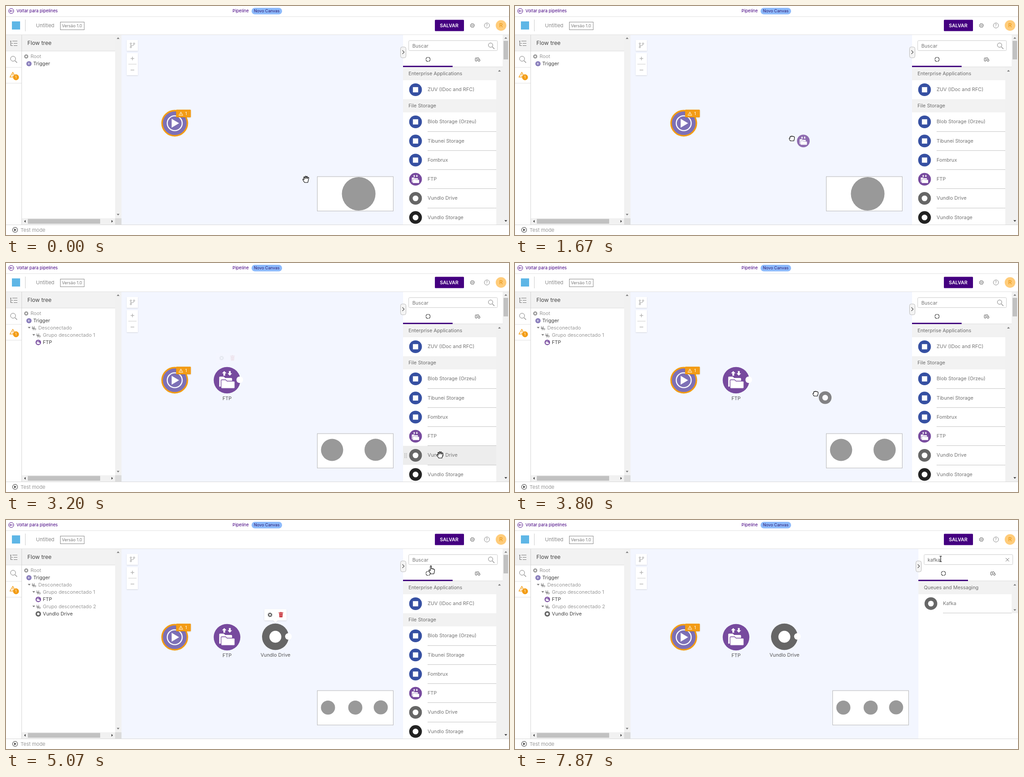
Recreate the animation shown at these times as an HTML page. Size 1106x506 px, loop 8000 ms.

```html
<!DOCTYPE html>
<html lang="pt">
<head>
<meta charset="utf-8">
<title>Pipeline</title>
<style>
html, body { margin: 0; width: 100%; height: 100%; overflow: hidden; background: #fff; }
svg { display: block; font-family: Inter, "Open Sans", sans-serif; }
text { white-space: pre; }
</style>
</head>
<body>
<svg id="stage" width="1106" height="506" viewBox="0 0 1106 506"></svg>
<script>
const PURPLE = '#440080', FTP = '#774a9e', BLUE = '#3650a2', GREY = '#666', ORANGE = '#f39c12';

const rect = (x, y, w, h, fill, more = '') =>
  `<rect x="${x}" y="${y}" width="${w}" height="${h}" fill="${fill}" ${more}/>`;
const circle = (x, y, r, fill, more = '') => `<circle cx="${x}" cy="${y}" r="${r}" fill="${fill}" ${more}/>`;
const line = (d, stroke, w = 1, more = '') =>
  `<path d="${d}" fill="none" stroke="${stroke}" stroke-width="${w}" ${more}/>`;
const fill = (d, color, more = '') => `<path d="${d}" fill="${color}" ${more}/>`;
// y is the middle of the capitals
const label = (x, y, s, color = '#747474', size = 10.8, more = '') =>
  `<text x="${x}" y="${y + size * .37}" fill="${color}" font-size="${size}" ${more}>${s}</text>`;
const group = (id, body, more = '') => `<g id="${id}" ${more}>${body}</g>`;
const at = (x, y, body, scale = 1) => `<g transform="translate(${x} ${y}) scale(${scale})">${body}</g>`;

// marks are drawn for a disc of radius 29
const marks = {
  square: rect(-12, -12, 24, 24, '#fff'),
  dot: circle(0, 0, 13, '#fff'),
  folder: fill('M-17 14V-6q0-2 2-2h8l3 3h13q2 0 2 2V14z', '#fff') +
    fill('M-11-1h8l3 3h15q2 0 2 2v12q0 2-2 2h-26q-2 0-2-2V1q0-2 2-2z', '#fff', `stroke="${FTP}" stroke-width="1.3"`) +
    fill('M-8-10v-5h-3l5-5 5 5h-3v5zM4-20h4v5h3l-5 5-5-5h3z', '#fff'),
  play: circle(0, 0, 17, 'none', 'stroke="#fff" stroke-width="2.4"') + fill('M-7-10L10 0-7 10z', '#fff')
};
const disc = (x, y, r, color, mark) => at(x, y, circle(0, 0, 29, color) + marks[mark], r / 29);

const arrow = (x, y, turn, color = '#777') =>
  `<path d="M-3 1.7L0-1.7 3 1.7z" fill="${color}" transform="translate(${x} ${y}) rotate(${turn})"/>`;
const lens = (x, y, r) => circle(x - 1, y - 1, r, 'none', 'stroke="#777"') +
  line(`M${x + r * .6} ${y + r * .6}l4.5 4.5`, '#777', 1.2);
const teeth = (x, y, r, color) =>
  circle(x, y, r * .88, 'none', `stroke="${color}" stroke-width="${r * .3}" stroke-dasharray="${r * .345}"`);
const gear = (x, y, r, color) =>
  circle(x, y, r * .62, 'none', `stroke="${color}" stroke-width="${r * .45}"`) + teeth(x, y, r, color);
const thinGear = (x, y, r, color) => [r * .3, r * .75].map(s => circle(x, y, s, 'none', `stroke="${color}"`)).join('') +
  teeth(x, y, r, color);
const warn = (x, y, s, color) => at(x, y, line('M0-5L5.5 4.5H-5.5z', color, 1.1, 'stroke-linejoin="round"') +
  line('M0-2V1.5M0 2.5V3.6', color, 1.1), s);
const plug = (x, y) => at(x, y, fill('M-4-1h6v2l-2 2h-2l-2-2z', '#999') +
  line('M-3-4v3M1-4v3M-1 3v2', '#999', 1.4) + gear(3, 2.5, 2.4, '#999'));
const branch = (y, n) => arrow(61, y, 180) + plug(71, y + .5) + label(81, y, 'Grupo desconectado ' + n, '#999');

const topBar = rect(0, 0, 1106, 64, '#fff') +
  line('M0 23.5H1106M0 63.5H1106', '#e2e2e2') +
  circle(11.5, 11, 5.5, 'none', `stroke="${PURPLE}"`) + line('M15 11H8.5M11 8.5L8.5 11 11 13.5', PURPLE) +
  label(23, 11, 'Voltar para pipelines', PURPLE, 9.4) +
  label(498, 10.3, 'Pipeline', PURPLE, 9.6) +
  rect(540, 4, 67, 14.5, '#8dbafb', 'rx="7.2"') + label(545, 11, 'Novo Canvas', '#2f1a70', 9) +
  rect(13, 34, 18, 18, '#5eb6e6') + line('M42.5 30V56', '#ccc') +
  label(66, 43, 'Untitled', '#8a8a8a', 11) +
  rect(119.5, 35.5, 52.5, 17, '#fff', 'stroke="#888"') + label(123, 44, 'Versão 1.0', '#777', 9.1) +
  rect(943, 30.5, 64, 25, PURPLE, 'rx="1.5"') + label(954, 43, 'SALVAR', '#fff', 10.5, 'font-weight="600"') +
  thinGear(1025.5, 43, 5, '#888') +
  circle(1057.5, 43, 5.7, 'none', 'stroke="#888"') + label(1055, 43, '?', '#888', 8.5) +
  circle(1088.5, 43, 11.7, '#ffcc7a') + label(1084.5, 43, 'R', '#e8920c', 12);

const rail = rect(0, 64, 34, 419, '#fff') + rect(0, 64, 34, 35, '#f2f2f2') +
  line('M0 99.5H34M0 135.5H34M0 170.5H34', '#e2e2e2') +
  line('M9 77.5h3M14 77.5H25M12 82.5h3M17 82.5H25M12 87.5h3M17 87.5H25M10.5 78V87.5H12', '#777', 1.2) +
  lens(16.5, 117.5, 5.5) + warn(15, 152, 1.15, ORANGE) +
  circle(22, 157.5, 6.5, ORANGE) + label(20, 157.5, '1', '#fff', 8);

const tree = rect(35, 64, 205, 405, '#fff') + rect(35, 64, 205, 35, '#f2f2f2') +
  line('M35 99.5H240', '#ddd') + label(47, 81, 'Flow tree', '#444', 12.2) +
  rect(240, 64, 14, 405, '#f1f1f1') + rect(35, 469, 205, 14, '#f1f1f1') + rect(240, 469, 14, 14, '#dcdcdc') +
  rect(48, 470.5, 159, 10.5, '#c1c1c1') +
  arrow(246.5, 71, 0) + arrow(246.5, 461, 180) + arrow(41.5, 475.7, -90, '#444') + arrow(233.5, 475.7, 90, '#444') +
  line('M34.5 64V483', '#d4d4d4') +
  circle(44.5, 111.5, 3.2, '#fff', 'stroke="#999" stroke-width="2.6"') + label(54, 111, 'Root', '#999') +
  disc(50.5, 127.5, 5.6, '#7a6db3', 'play') + label(60, 127, 'Trigger', '#444') +
  group('tree1', arrow(51, 143, 180) + plug(61, 143.5) + label(71, 143, 'Desconectado', '#999') +
    branch(159, 1) + disc(71, 175.5, 6, FTP, 'folder') + label(81, 175, 'FTP', '#444')) +
  group('tree2', branch(191, 2) + disc(71, 207.5, 6, GREY, 'dot') + label(81, 207, 'Vundlo Drive', '#444'));

const tools = rect(265.5, 75, 24.5, 24, '#fff', 'filter="url(#soft)"') +
  rect(265.5, 104, 24.5, 49, '#fff', 'filter="url(#soft)"') + line('M269 128.5H287', '#ccc') +
  line('M278 112V120M274 116H282M274 141.5H282', '#999') +
  line('M274.5 85V89.5M281.5 85Q281.5 87.5 274.5 88', '#999') +
  [[274.5, 83], [281.5, 83], [274.5, 91]].map(([x, y]) => circle(x, y, 1.5, '#fff', 'stroke="#999"')).join('');

const toolbox = (id, x, y) => group(id,
  `<g filter="url(#soft)">` + rect(x - 24.5, y - 12.5, 49, 25, '#fff', 'rx="2"') +
  fill(`M${x - 5} ${y + 12}h10l-5 5.5z`, '#fff') + '</g>' + gear(x - 12, y, 5, '#666') +
  fill(`M${x + 8} ${y - 3}h8l-.7 8.5h-6.6zM${x + 7} ${y - 5.2}h3.5l.5-1h2l.5 1h3.5v1.4h-10z`, '#c4262e') +
  line(`M${x + 10.5} ${y - 1.5}v5.5M${x + 13.5} ${y - 1.5}v5.5`, '#fff', .7));

const nodes = disc(371, 259, 28, '#7d70b6', 'play') +
  circle(371, 259, 27.8, 'none', `stroke="${ORANGE}" stroke-width="3.4"`) +
  rect(374, 229, 32.5, 17, ORANGE, 'rx="1.5" filter="url(#soft)"') +
  warn(384.5, 238, .8, '#fff') + label(394, 237.5, '1', '#fff', 9.5) +
  group('node1', disc(486, 259, 29.3, FTP, 'folder') + label(476, 299, 'FTP', '#555') +
    group('port1', circle(514, 258, 7.3, '#fff')) + toolbox('box1', 486, 210)) +
  group('node2', disc(592.3, 258, 29.3, GREY, 'dot') + circle(621, 257.3, 7.3, '#fff') +
    label(592.5, 298.5, 'Vundlo Drive', '#555', 10.8, 'text-anchor="middle"') + toolbox('box2', 592.5, 209.5));

const dots = (id, r, pts) => group(id, pts.map(([x, y]) => circle(x, y, r, '#999')).join(''));
const minimap = group('map', rect(684.5, 377, 167, 76, '#fff', 'stroke="#b5b5b5"') +
  dots('map0', 37, [[775.5, 415]]) + dots('map1', 24.4, [[717, 413], [812.7, 412.7]]) +
  dots('map2', 15.5, [[708, 414.5], [768, 414.5], [824, 414]]));

const rows = [
  [164, 'ZUV (IDoc and RFC)', BLUE, 'square'], [235, 'Blob Storage (Orzeu)', BLUE, 'square'],
  [277.3, 'Tibunei Storage', BLUE, 'square'], [319.5, 'Fombrux', BLUE, 'square'],
  [361.8, 'FTP', FTP, 'folder'], [404, 'Vundlo Drive', GREY, 'dot'], [446.3, 'Vundlo Storage', '#222', 'dot']
];
const row = ([y, name, color, mark]) => disc(900.5, y + 21, 14, color, mark) + label(927, y + 20.3, name) +
  line(`M927 ${Math.floor(y + 42) + .5}H1078`, '#c4c4c4');
const heading = (y, s) => rect(873, y, 205, 29, '#f2f2f2') + label(885, y + 13.7, s, '#6b6b6b');
const grip = [0, 1, 2, 3].map(i => circle(-1.5, i * 3, .9, '#aaa') + circle(2, i * 3, .9, '#aaa')).join('');

const panel = group('panel', rect(873, 64, 233, 419, '#fff') +
  rect(885.5, 76.5, 195, 22, '#fff', 'stroke="#ccc" rx="2"') +
  group('hint', label(893.5, 88, 'Buscar', '#757575', 10.7) + lens(1066.5, 87.5, 4.8)) +
  label(893.3, 88, '', '#666', 10.8, 'id="query"') +
  group('clear', line('M1065 84l7.5 7.5M1072.5 84L1065 91.5', '#666')) +
  rect(0, 82, 1, 12, '#222', 'id="caret"') +
  circle(928, 118, 4.6, 'none', 'stroke="#333" stroke-width="1.2" stroke-dasharray="6.2 1"') +
  rect(1032, 114.5, 3.6, 7.5, 'none', 'stroke="#444" rx="1.8"') + circle(1040, 120, 2.2, 'none', 'stroke="#444"') +
  line('M1036 114.5h3l1.5 3', '#444') +
  line('M873 134.5H1092', '#ddd') + rect(873, 132, 109, 3, PURPLE) +
  rect(1078, 135, 14, 348, '#f1f1f1', 'id="strip"') + arrow(1085, 143, 0) +
  group('all', group('hover', rect(873, 0, 205, 42, '#ededed') + at(878.5, 17, grip)) + rows.map(row).join('') +
    heading(135, 'Enterprise Applications') + heading(206, 'File Storage') +
    rect(1092, 64, 14, 419, '#f1f1f1') + rect(1094, 77, 10, 41, '#c1c1c1') +
    arrow(1099, 70.5, 0) + arrow(1099, 475, 180, '#333')) +
  group('found', heading(135, 'Queues and Messaging') + row([163.7, 'Kafka', GREY, 'dot']) + arrow(1085, 199, 180)) +
  rect(867.5, 90.5, 12, 24, '#f4f4f4', 'rx="4" stroke="#bbb"') + line('M871.5 98l4 4-4 4', '#555', 1.2));

const footer = rect(0, 483, 1106, 23, '#fff') + line('M0 483.5H1106', '#d8d8d8') +
  circle(20, 494.7, 5.5, 'none', 'stroke="#555" stroke-width="1.2"') + fill('M18 491.7l5 3-5 3z', '#444') +
  label(32, 494.5, 'Test mode', '#999', 11);

const cursors = {
  open: 'M-3.5 7C-5 4.5-8 1-7.5 0-7-1.2-5.5-.5-4.5 1L-5.5-4C-5.5-5.7-3.7-5.8-3.3-4.2L-2.5-1.5-2.4-6C-2.2-7.5-.4-7.5-.3-6L0-2 .9-5.8C1.3-7.2 3-6.8 2.8-5.3L2.3-1.5 4-3.8C4.8-5 6.3-4 5.8-2.8 5-.5 5 3 3.5 7z',
  closed: 'M-3.5 6C-5 3.5-6.5 2.5-6 .5-5.5-.5-4.8-.3-4.3.3V-2.5C-4.2-4.3-2.3-4.2-2-3.2-1.6-5 .5-5 .9-3.5 1.5-4.8 3.2-4.3 3.4-3 4.4-3.8 5.7-3 5.6-1.5 5.6 2 4.8 3 4 6z',
  point: 'M-2.5 9C-3 6-7 2.5-6.3 1-5.5-.3-4 .8-3 2V-7.5C-3-9.3-.6-9.3-.6-7.5V-2C0-3.2 1.8-3 2-1.6 2.7-2.6 4.3-2.2 4.4-.9 5.3-1.7 6.4-1 6.4.3 6.4 4 5.5 5 4.8 9z',
  beam: 'M-2.5-6H2.5M0-6V6M-2.5 6H2.5'
};

const stage = document.getElementById('stage');
stage.innerHTML = `<filter id="soft" x="-30%" y="-30%" width="160%" height="160%">
  <feDropShadow dx="0" dy="1" stdDeviation="1.2" flood-opacity=".14"/></filter>` +
  rect(254, 64, 640, 419, '#f3f6ff') + nodes + tools + minimap + topBar + rail + tree + panel + footer +
  group('ghost1', disc(0, 0, 14, FTP, 'folder'), 'opacity=".8"') +
  group('ghost2', disc(0, 0, 14, GREY, 'dot'), 'opacity=".8"') +
  fill('', '#fff', 'id="cursor" stroke="#000" stroke-width="1.1" stroke-linejoin="round"');

const el = id => document.getElementById(id);
const show = (id, on) => el(id).setAttribute('visibility', on ? 'inherit' : 'hidden');
const move = (id, x, y) => el(id).setAttribute('transform', `translate(${x} ${y})`);
const within = (t, a, b) => t >= a && t < b;
const ramp = (t, a, b) => Math.min(1, Math.max(0, (t - a) / (b - a)));

// time, x, y of the pointer
const path = [
  [0, 660, 383], [470, 937, 390], [800, 937, 390], [1140, 892, 374], [1200, 870, 361], [1670, 609, 292],
  [2130, 488, 260], [2270, 486, 259], [2400, 486, 259], [3200, 955, 424], [3270, 957, 424], [3400, 957, 424],
  [3740, 682, 297.5], [3800, 661, 288], [4130, 593, 258], [4400, 593, 258], [4870, 900, 185], [5070, 936, 110],
  [5330, 936, 86], [8000, 936, 86]
];
const slope = (i, c) => path[i] && path[i + 1] ? (path[i + 1][c] - path[i][c]) / (path[i + 1][0] - path[i][0]) : 0;
const tangent = (i, c) => {
  const a = slope(i - 1, c), b = slope(i, c);
  return a * b > 0 ? 2 * a * b / (a + b) : 0;
};
// monotone cubic interpolation
function pointer(t) {
  let i = 0;
  while (i < path.length - 2 && t >= path[i + 1][0]) i++;
  const h = path[i + 1][0] - path[i][0], u = ramp(t, path[i][0], path[i + 1][0]), v = 1 - u;
  return [1, 2].map(c => path[i][c] * v * v * (1 + 2 * u) + path[i + 1][c] * u * u * (3 - 2 * u) +
    h * u * v * (tangent(i, c) * v - tangent(i + 1, c) * u));
}

const keys = [6130, 6400, 6600, 7270, 7330];

function draw(t) {
  const [x, y] = pointer(t), typed = t >= 6130;
  const first = within(t, 870, 2470), second = within(t, 3330, 4470);

  show('tree1', t >= 2470);
  show('node1', t >= 2470);
  show('port1', within(t, 2470, 4470));
  show('tree2', t >= 4470);
  show('node2', t >= 4470);
  show('map0', t < 2470);
  show('map1', within(t, 2470, 4470));
  show('map2', t >= 4470);
  el('box1').setAttribute('opacity', ramp(t, 2460, 2600) * (1 - ramp(t, 2900, 3230)));
  el('box2').setAttribute('opacity', ramp(t, 4460, 4600) * (1 - ramp(t, 5070, 5270)));

  const over = !first && !second && x > 873 && rows.find(r => within(y, r[0], r[0] + 42.2));
  show('hover', over && !typed);
  if (over) move('hover', 0, over[0]);

  // the dragged disc trails the pointer
  const trail = pointer(Math.max(0, t - 60));
  show('ghost1', first);
  show('ghost2', second && t >= 3470);
  move('ghost1', ...trail);
  move('ghost2', ...trail);

  const shift = typed ? 14 : 0;
  move('panel', shift, 0);
  move('map', shift, 0);
  show('all', !typed);
  show('hint', !typed);
  show('found', typed);
  show('clear', typed);
  el('strip').setAttribute('height', typed ? 71 : 348);

  const count = keys.filter(k => t >= k).length, query = el('query');
  query.textContent = 'kafka'.slice(0, count);
  el('caret').setAttribute('x', 893 + (count ? query.getComputedTextLength() : 0));
  const last = [5330, ...keys].filter(k => t >= k).pop();
  show('caret', last && t - last < 530);

  const kind = x > 873 && y < 99 ? 'beam' : x > 873 && y < 135 ? 'point' :
    (first || second) && x < 865 ? 'closed' : 'open';
  el('cursor').setAttribute('d', cursors[kind]);
  move('cursor', x, y);
}

// the picture advances 15 times a second
function tick() {
  const step = Math.floor((performance.now() % 8000 + 3.4) * 15 / 1000);
  draw(Math.round(step * 100 / 15) * 10);
  requestAnimationFrame(tick);
}
tick();
</script>
</body>
</html>
```
